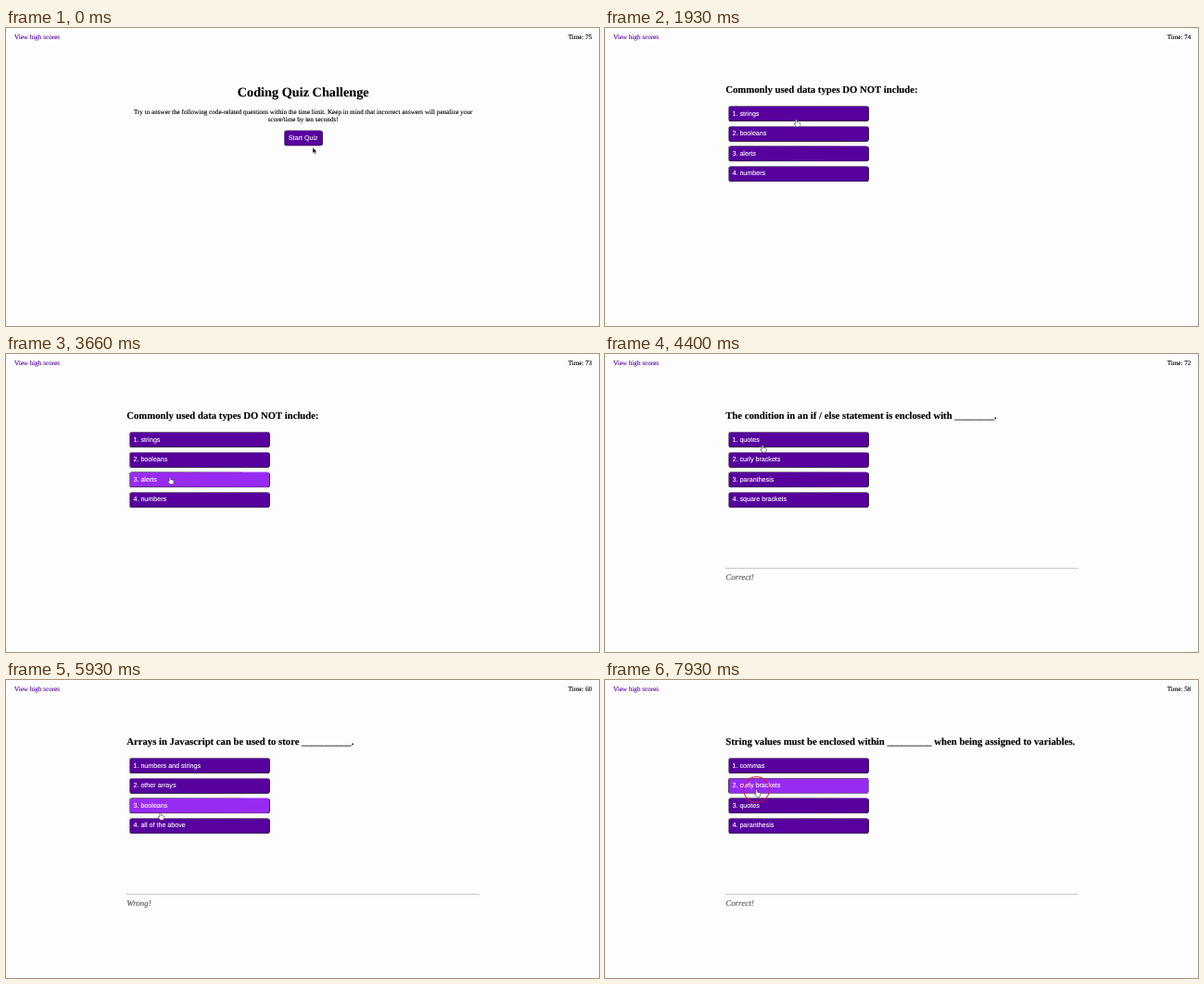
An HTML page that plays this animation: 640 by 322 pixels, repeating every 8000 ms.

```html
<!DOCTYPE html>
<html lang="en">
<head>
<meta charset="utf-8">
<title>Coding quiz</title>
<style>
  html, body { margin: 0; width: 100%; height: 100%; overflow: hidden; background: #fdfdfd; }
  /* The trace of rotation keeps small glyphs and edges from snapping to whole pixels. */
  #page {
    position: absolute; left: 0; top: 0; width: 1435px; height: 722px;
    transform: scale(calc(640 / 1435)) rotate(.005deg); transform-origin: 0 0;
    font: 16px "Liberation Serif", serif; color: #000;
    text-rendering: geometricPrecision; -webkit-text-stroke: .25px;
  }
  #page > *, section > * { position: absolute; white-space: nowrap; }
  section { left: 0; top: 0; }
  /* Zero line height makes "top" the optical middle of the text. */
  .text { margin: 0; line-height: 0; }
  .center { left: 1.5px; width: 1435px; text-align: center; }
  h1 { font-size: 32px; }
  h2 { font-size: 24px; left: 292px; top: 150px; }
  .link { left: 20px; top: 23px; color: #5a0aa5; }
  #time { right: 17px; top: 23px; }
  .button {
    box-sizing: border-box; height: 39px; padding: 0 8.5px;
    display: flex; align-items: center;
    font: 16px "Liberation Sans", sans-serif; color: #fff;
    background: #57009e; border: 2px solid; border-radius: 8px;
    border-color: #767676 #212121 #212121 #767676;
  }
  .button.hover { background: #982bf2; }
  .button.pressed { border-color: #212121 #767676 #767676 #212121; }
  #feedback hr {
    left: 292px; top: 518px; width: 853px; margin: 0; box-sizing: border-box;
    border: 1px solid; border-color: #9a9a9a #c4c4c4 #c4c4c4 #9a9a9a;
  }
  #verdict { left: 292px; top: 541px; font-size: 20px; font-style: italic; color: #555; }
  #pointer { left: 0; top: 0; overflow: visible; }
</style>
</head>
<body>
<div id="page">
  <div class="text link">View high scores</div>
  <div class="text" id="time"></div>
  <section id="intro">
    <h1 class="text center" style="top:154.5px">Coding Quiz Challenge</h1>
    <p class="text center" style="top:204px">Try to answer the following code-related questions within the time limit. Keep in mind that incorrect answers will penalize your</p>
    <p class="text center" style="top:223px">score/time by ten seconds!</p>
  </section>
  <section id="quiz"><h2 class="text" id="question"></h2></section>
  <section id="feedback"><hr><div class="text" id="verdict"></div></section>
  <svg id="pointer" width="1" height="1">
    <circle id="ring" r="31" fill="none" stroke="#d8143c" stroke-width="2.6"/>
    <path id="arrow" d="M0 0V14.5L3.4 11.4L5.8 17L8.4 15.9L6 10.5H10.5Z" fill="#000" stroke="#fff" stroke-width="1.2"/>
    <path id="hand" transform="scale(.86)" d="M-2 2Q-2 0 0 0T2 2V7Q4 6 5 8Q7 7 8 9Q11 8 11 11V14Q11 17 9 20H0Q-2 17 -6 13Q-7 10 -4 11L-2 12Z" fill="#fff" stroke="#222" stroke-width="1.4"/>
  </svg>
</div>
<script>
const LOOP = 8000, SCALE = 1435 / 640, START = 670, PRESS = 150, HOVER_LAG = 60;

const questions = [
  { from: START, text: "Commonly used data types DO NOT include:",
    options: ["strings", "booleans", "alerts", "numbers"] },
  { from: 4000, verdict: "Correct!", text: "The condition in an if / else statement is enclosed with ________.",
    options: ["quotes", "curly brackets", "paranthesis", "square brackets"] },
  { from: 4900, verdict: "Wrong!", text: "Arrays in Javascript can be used to store __________.",
    options: ["numbers and strings", "other arrays", "booleans", "all of the above"] },
  { from: 6550, verdict: "Correct!", text: "String values must be enclosed within _________ when being assigned to variables.",
    options: ["commas", "curly brackets", "quotes", "paranthesis"] },
];
const releases = [...questions.map(q => q.from), LOOP];

// Pointer stops: time, x, y
const stops = [
  [0, 331, 129], [80, 331, 129], [420, 323, 120], [950, 322, 120], [1130, 322.5, 124],
  [1700, 230, 110], [2050, 198, 95], [2460, 183, 109], [3000, 180, 109.5],
  [3150, 180, 110], [3600, 177, 133], [4100, 176, 132], [4400, 170, 98.5],
  [4600, 169, 92], [5150, 169, 92], [5500, 168, 114], [5930, 166.5, 143.5],
  [6200, 166, 155], [6750, 166, 155], [7130, 164.5, 140], [7400, 164.5, 137],
  [7750, 163.5, 118.5], [LOOP, 163.5, 118.5],
];

const $ = id => document.getElementById(id);
const show = (el, on) => { el.style.visibility = on ? "visible" : "hidden"; };
const setText = (el, text) => { if (el.textContent !== text) el.textContent = text; };

function addButton(parent, x, y, width, label = "") {
  const el = document.createElement("div");
  el.className = "button";
  el.textContent = label;
  Object.assign(el.style, { left: x * SCALE + "px", top: y * SCALE + "px", width: width * SCALE + "px" });
  parent.append(el);
  return { el, x, y, width, height: 39 / SCALE };
}

const startButton = addButton($("intro"), 299.6, 110.2, 42.4, "Start Quiz");
startButton.el.style.justifyContent = "center";
startButton.el.style.padding = 0;
const optionButtons = [0, 1, 2, 3].map(i => addButton($("quiz"), 132.8, 84 + i * 21.6, 152.2));

function pointerAt(t) {
  const i = Math.max(1, stops.findIndex(s => s[0] >= t));
  const [t0, x0, y0] = stops[i - 1], [t1, x1, y1] = stops[i];
  const p = Math.max(0, (t - t0) / (t1 - t0));
  const eased = p * p * (3 - 2 * p);
  return { x: x0 + (x1 - x0) * eased, y: y0 + (y1 - y0) * eased };
}

function paintButton(button, at, down) {
  const hover = at.x >= button.x && at.x <= button.x + button.width &&
    at.y >= button.y && at.y <= button.y + button.height;
  button.el.classList.toggle("hover", hover);
  button.el.classList.toggle("pressed", hover && down);
}

function render(t) {
  const current = questions.filter(q => t >= q.from).pop();
  const seconds = Math.max(0, Math.floor((t - START) / 1000));
  const penalty = t >= questions[2].from ? 10 : 0;
  setText($("time"), "Time: " + (75 - seconds - penalty));

  show($("intro"), !current);
  show($("quiz"), current);
  show($("feedback"), current && current.verdict);
  if (current) {
    setText($("question"), current.text);
    setText($("verdict"), current.verdict || "");
    current.options.forEach((label, i) => setText(optionButtons[i].el, `${i + 1}. ${label}`));
  }

  const down = releases.some(r => t >= r - PRESS && t < r);
  const lagged = pointerAt(Math.max(0, t - HOVER_LAG));
  [startButton, ...optionButtons].forEach(b => paintButton(b, lagged, down));

  const { x, y } = pointerAt(t);
  $("pointer").style.transform = `translate(${x * SCALE}px, ${y * SCALE}px)`;
  const onHand = t > 200;
  show($("arrow"), !onHand);
  show($("hand"), onHand);
  const fade = Math.max(0, ...releases.map(r => t < r - PRESS ? 0 : 1 - Math.max(0, t - r) / 120));
  $("ring").style.opacity = fade * .85;
}

const began = performance.now();
function frame() {
  render((performance.now() - began) % LOOP);
  requestAnimationFrame(frame);
}
frame();
</script>
</body>
</html>
```
